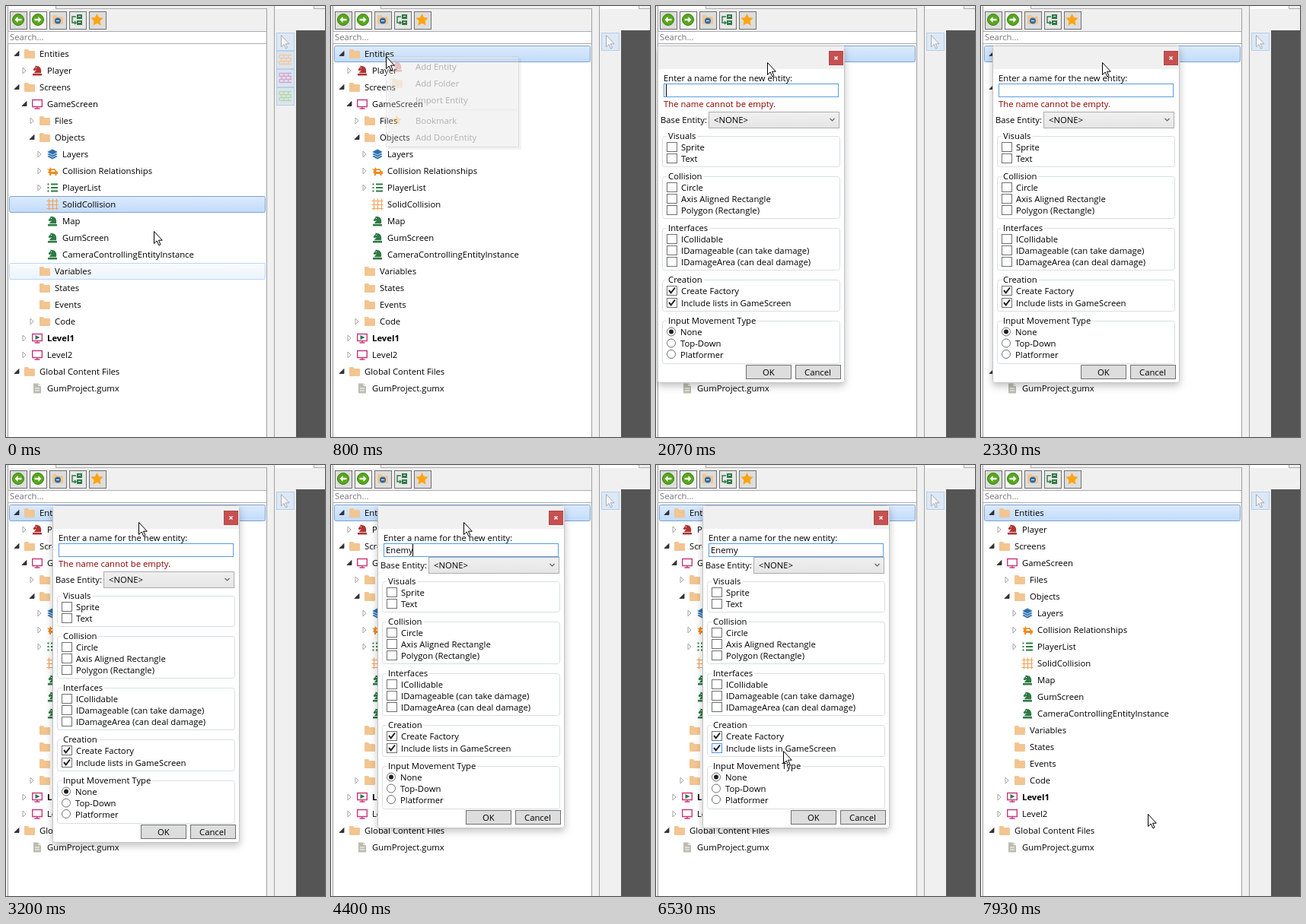
Animation, 419 px wide and 567 px high, one loop 8000 ms. Source, as an HTML page with a canvas:

```html
<!DOCTYPE html>
<html lang="en">
<head>
<meta charset="utf-8">
<title>Add entity</title>
<style>
html, body { margin: 0; width: 100%; height: 100%; overflow: hidden; background: #fff; }
canvas { display: block; }
</style>
</head>
<body>
<canvas id="stage" width="419" height="567"></canvas>
<script>
const c = document.getElementById('stage').getContext('2d');
const LOOP = 8000, FPS = 0.015;
const FONT = '11.3px "Open Sans", "Noto Sans", sans-serif';
const GREEN = '#2f7a45', RED = '#b03434', PINK = '#c8397f', ORANGE = '#f08a1d', PEACH = '#f2c591';

// ---------- drawing helpers ----------
function box(x, y, w, h, fill, stroke) {
  if (fill) { c.fillStyle = fill; c.fillRect(x, y, w, h); }
  if (stroke) { c.strokeStyle = stroke; c.lineWidth = 1; c.strokeRect(x + .5, y + .5, w - 1, h - 1); }
}
function roundBox(x, y, w, h, r, fill, stroke) {
  c.beginPath(); c.roundRect(x + .5, y + .5, w - 1, h - 1, r);
  if (fill) { c.fillStyle = fill; c.fill(); }
  c.strokeStyle = stroke; c.lineWidth = 1; c.stroke();
}
function text(s, x, yMid, color = '#000', style = '') {
  c.font = style + ' ' + FONT;
  c.fillStyle = color;
  c.fillText(s, x, Math.round(yMid + 4));
}
function shape(x, y, d, fill, stroke, width = 1) {
  c.save(); c.translate(x, y);
  const p = new Path2D(d);
  if (fill) { c.fillStyle = fill; c.fill(p); }
  if (stroke) { c.strokeStyle = stroke; c.lineWidth = width; c.stroke(p); }
  c.restore();
}
function disc(x, y, r, fill, stroke, width = 1) {
  c.beginPath(); c.arc(x, y, r, 0, 7);
  if (fill) { c.fillStyle = fill; c.fill(); }
  if (stroke) { c.strokeStyle = stroke; c.lineWidth = width; c.stroke(); }
}
function vertical(y, h, top, bottom) {
  const g = c.createLinearGradient(0, y, 0, y + h);
  g.addColorStop(0, top); g.addColorStop(1, bottom);
  return g;
}
function star(x, y, r) {
  c.beginPath();
  for (let i = 0; i < 10; i++) {
    const a = i * Math.PI / 5 - Math.PI / 2, q = i % 2 ? r * .5 : r;
    c.lineTo(x + q * Math.cos(a), y + q * Math.sin(a));
  }
  c.closePath(); c.fillStyle = '#ffa410'; c.fill();
}

// ---------- icons, centred on x, y ----------
function knight(x, y, color) {
  shape(x, y, 'M-6 6.5H6V4H-6ZM-4 3.2C-4 1.5 -2 .8 -1 -.8L-4 .2L-5.5 -1.2L-2.5 -5L-2.5 -6.5L-.5 -6C4 -6 6 -2 5 3.2Z', color);
  box(x - 2, y - 4, 1, 1, '#fff');
}
const icon = {
  folder: (x, y) => shape(x, y, 'M-6 -6H-2L-.5 -4H6Q7 -4 7 -3V5Q7 6 6 6H-6Q-7 6 -7 5V-5Q-7 -6 -6 -6Z', PEACH),
  entity: (x, y) => knight(x, y, RED),
  object: (x, y) => knight(x, y, GREEN),
  screen: (x, y) => shape(x, y, 'M-6.3 -5.5H6.3V3.5H-6.3ZM0 3.5V6M-3.5 6H3.5', null, PINK, 1.4),
  level(x, y) { icon.screen(x, y); shape(x, y, 'M-2.5 -4L3.5 -1L-2.5 2Z', GREEN); },
  layers(x, y) {
    for (const dy of [3, 0, -3]) shape(x, y + dy, 'M0 -4L7.5 0L0 4L-7.5 0Z', '#2e70b0', '#fff', .8);
  },
  car(x, y) {
    shape(x, y, 'M-7 -3L-4 -2L-3 -5L-1 -2.5L3 -3L5 0L7 1V4H5.5V6H3.5V4H-2V6H-4V3.5L-6 2L-4.5 0Z', ORANGE);
    shape(x, y, 'M-1 -1H2.5L3.5 1H-2Z', '#fff');
  },
  list: (x, y) => shape(x, y, 'M-2 -4.5H7M-2 0H7M-2 4.5H7M-6.5 -4.5H-4.5M-6.5 0H-4.5M-6.5 4.5H-4.5', null, GREEN, 1.8),
  grid: (x, y) => shape(x - .5, y - .5, 'M-7 -4H8M-7 1H8M-7 6H8M-4 -7V8M1 -7V8M6 -7V8', null, '#f3a45a', 1.2),
  file(x, y) {
    shape(x, y, 'M-5 -6.5H2L5 -3.5V6.5H-5Z', '#bcbcb0');
    shape(x, y, 'M2 -6.5V-3.5H5M-3 0H3M-3 3H3', null, '#fff', 1);
  }
};

// ---------- tree: label, icon, depth, expander (1 open, 2 closed) ----------
const tree = [
  ['Entities', 'folder', 0, 1], ['Player', 'entity', 1, 2], ['Screens', 'folder', 0, 1],
  ['GameScreen', 'screen', 1, 1], ['Files', 'folder', 2, 2], ['Objects', 'folder', 2, 1],
  ['Layers', 'layers', 3, 2], ['Collision Relationships', 'car', 3, 2], ['PlayerList', 'list', 3, 2],
  ['SolidCollision', 'grid', 3], ['Map', 'object', 3], ['GumScreen', 'object', 3],
  ['CameraControllingEntityInstance', 'object', 3], ['Variables', 'folder', 2], ['States', 'folder', 2],
  ['Events', 'folder', 2], ['Code', 'folder', 2, 2], ['Level1', 'level', 1, 2], ['Level2', 'screen', 1, 2],
  ['Global Content Files', 'folder', 0, 1], ['GumProject.gumx', 'file', 1]
];
function drawTree(selected, hovered) {
  tree.forEach(([label, kind, depth, expander], i) => {
    const y = 63 + 22 * i, x = 10 * depth, top = y - 11;
    if (i === selected) roundBox(4, top, 337, 22, 2, vertical(top, 22, '#dcebfc', '#c1dbfc'), '#7da2ce');
    else if (i === hovered) roundBox(4, top, 337, 22, 2, vertical(top, 22, '#fafbfd', '#ebf3fd'), '#b8d6fb');
    if (expander === 1) shape(x + 14, y, 'M3 -3.5V2.5H-3Z', '#333', '#262626', .8);
    if (expander === 2) shape(x + 13.5, y, 'M-1.5 -4V4L2.5 0Z', '#fff', '#a5a5a5');
    icon[kind](x + 31, y);
    text(label, x + 44, y, '#000', kind === 'level' ? 'bold' : '');
  });
}

// ---------- surrounding window ----------
function toolButton(i, fill) { box(5 + 26 * i, 7, 23, 24, fill, '#707070'); }
function arrowDisc(x, y, flip) {
  disc(x, y, 7.5, '#56a71c', '#3d8412');
  c.save(); c.translate(x, y); c.scale(flip, 1);
  shape(0, 0, 'M4.5 0L.5 -4V-1.3H-4.5V1.3H.5V4Z', '#fff');
  c.restore();
}
function bricks(y, color) {
  box(355, y, 24, 24, '#dbe5f0', '#b7cfe6');
  shape(367, y + 12, 'M-8 -6.5H8M-8 -2.5H8M-8 1.5H8M-8 5.5H8M-8 -6.5V-2.5M-2 -6.5V-2.5M4 -6.5V-2.5M-5 -2.5V1.5M1 -2.5V1.5M7 -2.5V1.5M-8 1.5V5.5M-2 1.5V5.5M4 1.5V5.5', null, color, 1.3);
}
function drawWindow(tilesShown) {
  box(0, 0, 419, 567, '#f0f0f0');
  box(3, 0, 62, 4, '#fff');
  box(65, 3, 278, 1, '#acacac'); box(65, 0, 1, 4, '#acacac');
  box(2, 0, 1, 567, '#a0a0a0');
  ['#ddd', '#f4f4f4', '#ddd', '#e8e8e8', '#ddd'].forEach((fill, i) => toolButton(i, fill));
  arrowDisc(16, 18, -1); arrowDisc(42, 18, 1);
  icon.folder(68, 18); disc(68, 19.5, 4, '#2d6da8'); box(66, 19, 4, 1, '#fff');
  box(93, 11, 7, 6, GREEN); box(93, 19, 7, 6, GREEN);
  shape(89, 18, 'M3 -4H-2V4H3M1 2L3 4L1 6', null, GREEN, 1.4);
  box(95, 13, 3, 1, '#fff'); box(95, 21, 3, 1, '#fff');
  star(119.5, 18.5, 8.5);
  box(2, 33, 341, 17, '#fff', '#abadb3');
  text('Search...', 5, 41, '#777');
  box(3, 50, 339, 517, '#fff');
  box(342, 3, 1, 564, '#a0a0a0'); box(352, 0, 1, 567, '#a0a0a0');
  box(353, 0, 51, 4, '#fff'); box(404, 3, 15, 1, '#acacac'); box(404, 0, 1, 4, '#acacac');
  box(381, 32, 38, 535, '#555');
  box(355, 35, 24, 24, '#dce8f5', '#b5d0ea');
  shape(361, 38, 'M.5 .5V16L4 12.5L6.5 18L8.5 17L6.2 11.8H11Z', '#f5f5f5', '#a8adb5');
  if (tilesShown) { bricks(59, '#f5c79b'); bricks(83, '#d6a5cf'); bricks(107, '#b5d8a8'); }
}

function drawMenu(alpha, hot) {
  c.save(); c.globalAlpha = alpha;
  box(75, 69, 175, 120, 'rgba(0,0,0,.18)');
  box(72, 66, 175, 120, '#f0f0f0', '#a0a0a0');
  if (hot) box(75, 69, 171, 22, '#c1e0ee', '#26a0da');
  knight(87, 80, RED); icon.folder(87, 101.5); star(86.5, 150.5, 6.5);
  ['Add Entity', 'Add Folder', 'Import Entity', 'Bookmark', 'Add DoorEntity']
    .forEach((s, i) => text(s, 111, 79.5 + 22.2 * i + (i > 2 ? 4.6 : 0)));
  box(106, 136, 139, 1, '#d0d0d0');
  c.restore();
}

// ---------- dialog: title, top, bottom, items as [label, y, checked] ----------
const groups = [
  ['Visuals', 119, 160, [['Sprite', 134], ['Text', 149]]],
  ['Collision', 172, 228, [['Circle', 187], ['Axis Aligned Rectangle', 202], ['Polygon (Rectangle)', 217]]],
  ['Interfaces', 240, 296, [['ICollidable', 255], ['IDamageable (can take damage)', 270], ['IDamageArea (can deal damage)', 285]]],
  ['Creation', 308, 350, [['Create Factory', 323, 1], ['Include lists in GameScreen', 339, 1]]],
  ['Input Movement Type', 362, 419, [['None', 377, 1], ['Top-Down', 392], ['Platformer', 406.5]]]
];
function drawDialog(x, y, alpha, name, caret, mx, my) {
  const lift = name ? 19 : 0, height = 444 - lift;
  mx -= x; my -= y;
  c.save(); c.globalAlpha = alpha; c.translate(x, y);
  c.save();
  c.shadowColor = 'rgba(0,0,0,.22)'; c.shadowBlur = 10; c.shadowOffsetY = 4;
  roundBox(-1, 0, 246, height, 3, '#fff', '#fff');
  c.restore();
  roundBox(-1, 0, 246, height, 3, '#fff', '#c4c4c4');
  box(0, 1, 244, 30, '#f0f0f0');
  box(224, 7, 19, 19, '#c75050', '#b04a4a');
  shape(233.5, 16.5, 'M-2 -2L2 2M2 -2L-2 2', null, '#fff', 1.4);

  text('Enter a name for the new entity:', 7, 43);
  box(7, 50, 230, 18, '#fff', '#569de5');
  text(name, 10, 59);
  if (caret) box(Math.floor(10 + c.measureText(name).width), 51, 1, 16, '#000');
  if (!name) text('The name cannot be empty.', 7, 77, '#8b0000');

  c.translate(0, -lift); my += lift;
  text('Base Entity:', 3, 98);
  box(66, 87, 172, 22, vertical(87, 22, '#f0f0f0', '#e5e5e5'), '#acacac');
  text('<NONE>', 73, 98);
  shape(228.5, 97.5, 'M-3 -1.5L0 1.5L3 -1.5', null, '#606060', 1.2);

  for (const [title, top, bottom, items] of groups) {
    roundBox(5, top, 234, bottom - top, 3, null, '#d5dfe5');
    c.font = FONT;
    box(11, top - 4, c.measureText(title).width + 4, 9, '#fff');
    text(title, 13, top);
    for (const [label, iy, checked] of items) {
      const radio = top === 362;
      c.font = FONT;
      const hot = name && mx > 11 && mx < 30 + c.measureText(label).width && Math.abs(my - iy) < 8;
      const edge = hot ? '#5593ff' : '#707070', fill = hot ? '#f3f9ff' : '#fff';
      if (radio) {
        disc(17, iy - .5, 5.5, fill, edge);
        if (checked) disc(17, iy - .5, 3, '#212121');
      } else {
        box(11, iy - 7, 14, 13, fill, edge);
        if (checked) shape(18, iy - .5, 'M-4 -.5L-1.3 2.8L4 -4', null, '#212121', 2);
      }
      text(label, radio ? 29 : 30, iy);
    }
  }
  [['OK', 115, 22], ['Cancel', 180, 12]].forEach(([label, bx, dx]) => {
    const hot = mx > bx && mx < bx + 60 && my > 420 && my < 440;
    box(bx, 420, 60, 19, hot ? '#bee6fd' : '#ddd', hot ? '#3c7fb1' : '#707070');
    text(label, bx + dx, 429.5);
  });
  c.restore();
}

// ---------- motion ----------
const pointerKeys = [
  [-70, 210, 349], [0, 194, 296], [333, 73, 66], [400, 73, 66], [467, 72, 66], [1133, 72, 66],
  [1467, 93, 78], [1533, 93, 78], [2000, 144, 74], [2333, 159, 74], [2867, 203, 75], [2933, 203, 75],
  [3200, 174, 75], [5067, 174, 75], [5333, 189, 160], [5933, 134, 382], [6133, 131, 376],
  [6200, 131, 376], [6533, 167, 376], [6933, 219, 378], [7000, 219, 378], [7600, 219, 459]
];
const dialogKeys = [[2000, 1, 52], [2333, 16, 52], [2867, 62, 53]];
const caretToggles = [1800, 2130, 2660, 3190, 3720, 4930, 5460, 5930, 6590, 7060, 7590];
const keystrokes = [3720, 3930, 4060, 4130, 4390];

function at(keys, t) {
  const n = keys.findIndex(k => k[0] > t);
  if (n < 0) return keys[keys.length - 1].slice(1);
  if (n === 0) return keys[0].slice(1);
  const a = keys[n - 1], b = keys[n], u = (t - a[0]) / (b[0] - a[0]);
  const e = (u + u * u * (3 - 2 * u)) / 2;
  return [1, 2].map(i => Math.round(a[i] + (b[i] - a[i]) * e));
}
const passed = (times, t) => times.filter(k => k <= t).length;
const clamp = v => Math.max(0, Math.min(1, v));

function draw(t) {
  const [mx, my] = at(pointerKeys, t);
  const picked = t >= 730;
  drawWindow(!picked);
  // row highlight trails the pointer by one step
  drawTree(picked ? 0 : 9, picked ? -1 : Math.floor((at(pointerKeys, t - 67)[1] - 52) / 22));
  if (t > 790 && t < 1590) drawMenu(clamp((t - 730) / 260), my > 68);
  const alpha = t < 7860 ? clamp((t - 1650) / 200) : t < 7930 ? .4 : 0;
  if (alpha) {
    const [dx, dy] = at(dialogKeys, t);
    drawDialog(dx, dy, alpha, 'Enemy'.slice(0, passed(keystrokes, t)), passed(caretToggles, t) % 2, mx, my);
  }
  shape(mx, my, 'M.5 .5V16.5L4.2 13L6.8 18.8L9 17.8L6.5 12.2H11.3Z', '#fff', '#000');
}

const start = performance.now();
function tick() {
  const t = (performance.now() - start) % LOOP;
  draw(Math.round(Math.floor((t + 4) * FPS) / FPS) % LOOP);
  requestAnimationFrame(tick);
}
tick();
</script>
</body>
</html>
```
